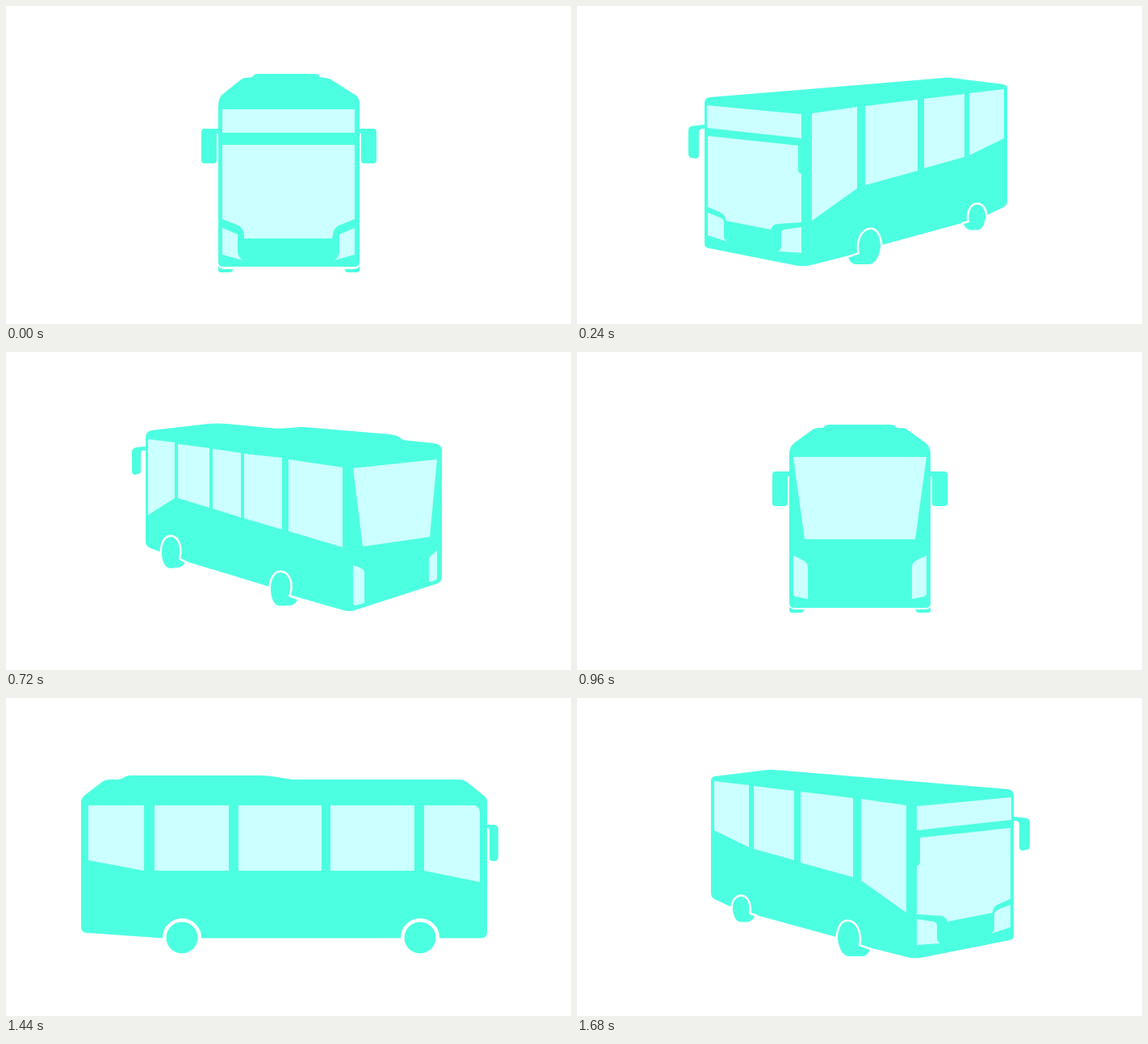
Write an HTML page that moves like this. It is 700 by 394 pixels and loops after 1.92 s.

```html
<!DOCTYPE html>
<html lang="en">
<head>
<meta charset="utf-8">
<title>Turning bus</title>
<style>
html, body { margin: 0; width: 100%; height: 100%; overflow: hidden; background: #fff; }
svg { display: block; width: 100vw; height: 100vh; fill: #4dffe1; }
.glass { fill: #cff; }
.wheel { stroke: #fff; stroke-width: 5; paint-order: stroke; }
.side .wheel { stroke-width: 9; }
.pose { visibility: hidden; animation: turn 1920ms step-end infinite; animation-delay: calc(var(--i) * 240ms - 1920ms); }
@keyframes turn {
  0% { visibility: visible; }
  12.5%, 100% { visibility: hidden; }
}
</style>
</head>
<body>
<svg viewBox="0 0 700 394" xmlns="http://www.w3.org/2000/svg">
  <defs>
    <g id="front">
      <path d="M263 123Q263 113 270 108L290 92Q293 89 298 89L305 88Q307 84 313 84H382Q388 84 389 88L400 90Q402 90 404 92L434 111Q438 114 438 123V317Q438 323 432 323H269Q263 323 263 317Z"/>
      <g id="frontSide">
        <path d="M264 152H246Q242 152 242 156V191Q242 195 246 195H257Q261 195 261 191V158H264Z"/>
        <path d="M263 322Q265 326 271 326H281.500Q281 330 277 330H266Q263 330 263 327Z"/>
      </g>
      <use href="#frontSide" transform="matrix(-1 0 0 1 701 0)"/>
      <g class="glass">
        <path d="M268 128H432V157H268ZM268 172H432V264L412 272Q405 276 405 284L404 288H295V284Q295 276 288 272L268 264Z"/>
        <path id="headlight" d="M268 275L287 283V303Q287 311 293 315L268 308Z"/>
        <use href="#headlight" transform="matrix(-1 0 0 1 700 0)"/>
      </g>
    </g>

    <g id="frontTurn">
      <path d="M158 120Q158 114 165 113L455 89Q459 88.600 463 89L528 97Q533 98 533 102V241Q533 247 529 249L508 259L484 267L378 296L349 306L290 321Q284 323 274 322L163 300Q158 299 158 295Z"/>
      <path d="M158 147L144 148.500Q138 149 138 154V183Q138 188 142 188L147 189Q151 189 151 185V157Q151 153 155 152L158 152Z"/>
      <path class="wheel" d="M336 312L350 307C347 292 353 277 364 277C372 277 376 288 376 298C375 309 370 320 362 320H345Q340 320 336 312Z"/>
      <path class="wheel" d="M479 270L486 268C484 258 487 246 496 246C503 246 507 255 506 263C505 270 502 277.500 496 277.500H488Q481 277 479 270Z"/>
      <g class="glass">
        <path d="M161 123L278 134V164L161 151ZM162 161L274 173V203Q274 207 278 208V268L248 270Q242 271 240 277L184 266Q184 259 178 256L162 249Z"/>
        <path d="M162 256L177 262Q182 264 182 268V285Q182 289 186 292L162 284ZM278 274L257 277Q253 278 253 283V297Q253 302 249 304L278 306Z"/>
        <path d="M291 133L347 125V226L291 266ZM357 124L422 116V204L357 222ZM430 115L480 109V187L430 201ZM486 108L529 103V164L486 185Z"/>
      </g>
    </g>

    <g id="side" class="side">
      <path d="M99 128Q99 124 103 121L124 104Q128 101 133 101H340L366 97Q374 96 380 96H540Q546 96 550 99Q553 101 556 101H566Q572 101 576 104L597 120Q602 124 602 129V284Q602 290 595 291L501 297.500H106Q99 297.500 99 290Z"/>
      <path d="M99 157H91Q85 157 85 163V196Q85 202 90 202H92Q96 202 96 198V164Q96 161 99 161Z"/>
      <circle class="wheel" cx="182" cy="297" r="19.500"/>
      <circle class="wheel" cx="477" cy="297" r="19.500"/>
      <path class="glass" d="M108 228V142Q108 133 117 133H177V214ZM189 133H293V214H189ZM304 133H407V214H304ZM419 133H511V214H419ZM524 133H593V201L524 214Z"/>
    </g>

    <g id="rearTurn">
      <path d="M173 106Q173 98 181 97L250 89Q264 88 274 89L337 95L365 93Q373 93 381 94L476 102Q484 103 488 106L492 109L530 113Q540 114 540 122V278Q540 285 534 287L432 320Q426 322 418 320L352 301L327 291L215 257L179 243Q173 241 173 235Z"/>
      <path d="M173 117L162 118Q156 119 156 124V148Q156 152 160 152L164 151Q167 151 167 147V124Q167 122 170 122H173Z"/>
      <path class="wheel" d="M204 229C211 229 216 238 215 249L214 257L221.500 261Q218 267 213 267L203 268C197 267 193 259 193 249C193 238 197 229 204 229Z"/>
      <path class="wheel" d="M340 273C348 273 354 283 352 295L350 303L361 307Q358 314 352 314L338 314.500C331 313 328 303 328 293C328 282 333 273 340 273Z"/>
      <g class="glass">
        <path d="M176 108L209 112V181L176 202ZM213 114L252 119V193L213 181ZM256 120L291 125V205L256 194ZM295 126L342 131V220L295 206ZM350 133L417 143V242L350 222Z"/>
        <path d="M430 144L534 133L525 229L442 241Z"/>
        <path d="M430 264L438 267Q444 269 444 274V311L433 314Q430 314 430 311ZM534 246V280Q534 282 532 283L524 285V259Q524 254 527 252Z"/>
      </g>
    </g>

    <g id="rear">
      <path d="M263 126Q263 117 270 112L292 96Q295 94 300 94H305Q307 90 313 90H388Q394 90 396 94H401Q406 94 409 96L431 112Q438 117 438 126V311Q438 317 432 317H269Q263 317 263 311Z"/>
      <g id="rearSide">
        <path d="M264 148H246Q242 148 242 152V187Q242 191 246 191H257Q261 191 261 187V154H264Z"/>
        <path d="M263 316Q265 319 271 319H281.500Q281 323 277 323H266Q263 323 263 320Z"/>
        <path class="glass" d="M268 252L280 258Q286 261 286 267V306L271 303Q268 302 268 299Z"/>
      </g>
      <use href="#rearSide" transform="matrix(-1 0 0 1 701 0)"/>
      <path class="glass" d="M268 130H433L419 232H282Z"/>
    </g>
  </defs>

  <use class="pose" style="--i:0" href="#front"/>
  <use class="pose" style="--i:1" href="#frontTurn"/>
  <use class="pose" style="--i:2" href="#side"/>
  <use class="pose" style="--i:3" href="#rearTurn"/>
  <use class="pose" style="--i:4" href="#rear"/>
  <use class="pose" style="--i:5" href="#rearTurn" transform="matrix(-1 0 0 1 687 0)"/>
  <use class="pose" style="--i:6" href="#side" transform="matrix(-1 0 0 1 695 0)"/>
  <use class="pose" style="--i:7" href="#frontTurn" transform="matrix(-1 0 0 1 699 0)"/>
</svg>
</body>
</html>
```
